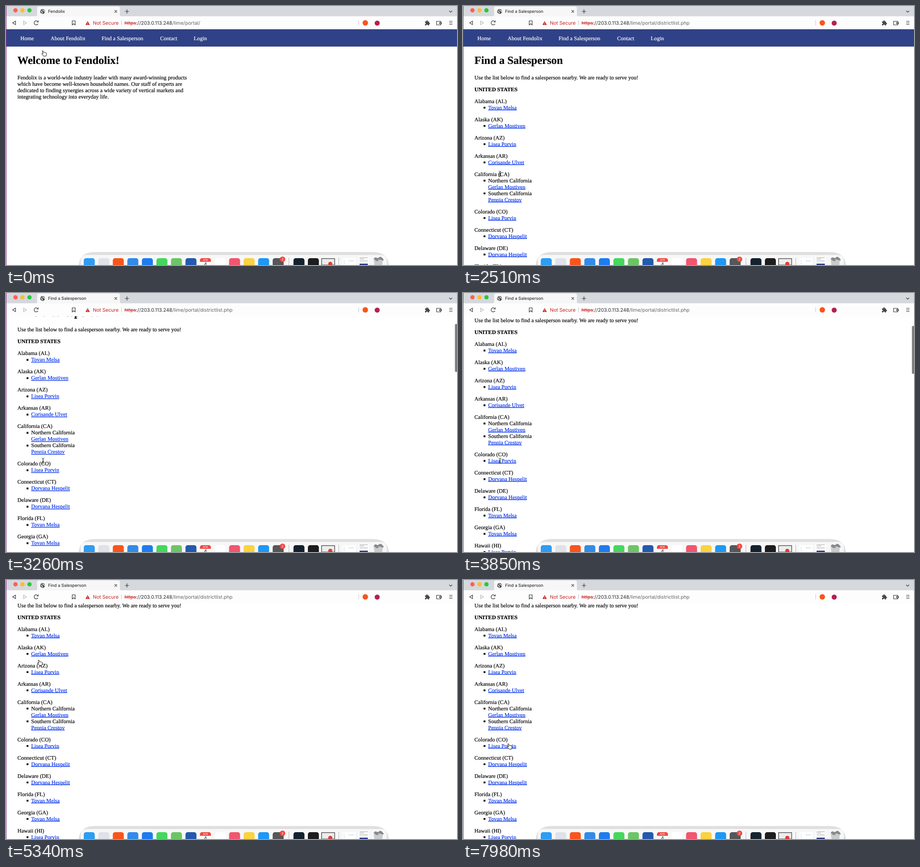
An HTML page that plays this animation: 986 px wide and 568 px high, repeating every 8 s.

```html
<!DOCTYPE html>
<html lang="en">
<head>
<meta charset="utf-8">
<title>Browser walkthrough</title>
<style>
  html, body { margin: 0; width: 100%; height: 100%; overflow: hidden; background: #fff; }
  svg { display: block; width: 986px; height: 568px; }
  text { white-space: pre; text-rendering: geometricPrecision; }
  .page { font: 12.05px "Liberation Serif", "Times New Roman", serif; }
  .page text { stroke: #000; stroke-width: .2; }
  .page #nav text { stroke: #fff; }
  .page .title { font-size: 24px; font-weight: bold; }
  .page .bold { font-weight: bold; }
  .page .link { fill: #0230ea; stroke: #0230ea; text-decoration: underline; }
  .ui { font-family: Inter, Roboto, sans-serif; }
  .line { fill: none; stroke: #333; stroke-width: 1.2; }
</style>
</head>
<body>
<svg viewBox="0 0 986 568">
  <defs>
    <clipPath id="view"><rect y="51" width="986" height="517"/></clipPath>
    <linearGradient id="fade" gradientUnits="userSpaceOnUse" x1="212" x2="230">
      <stop stop-color="#303236"/><stop offset="1" stop-color="#303236" stop-opacity="0"/>
    </linearGradient>
  </defs>
  <rect width="986" height="568" fill="#fff"/>

  <g class="page" clip-path="url(#view)">
    <g id="scroller">
      <rect y="51" width="986" height="38" fill="#304287"/>
      <g id="nav" fill="#fff"></g>
      <g id="home"></g>
      <g id="list"></g>
    </g>
    <rect id="thumb" x="981.5" y="52" width="6" height="105" rx="2" fill="#7c7c7c"/>
  </g>

  <g class="ui">
    <rect width="986" height="23" fill="#d5d8dc"/>
    <rect y="22.5" width="986" height="28.5" fill="#fdfdfd"/>
    <path d="M64 23q4 0 4-4V5q0-4 4-4h173q4 0 4 4v14q0 4 4 4z" fill="#f7f7f7"/>
    <circle cx="20.7" cy="9.5" r="4.7" fill="#fe5f57"/>
    <circle cx="36" cy="9.5" r="4.7" fill="#febc2e"/>
    <circle cx="51.3" cy="9.5" r="4.7" fill="#28c840"/>
    <g id="globe">
      <circle cx="80" cy="12" r="5.2" fill="#4b4d50"/>
      <path d="M76 11q2 0 3 2t-1 3M80 8q0 2 2 2t2 3" fill="none" stroke="#f7f7f7" stroke-width="1.4"/>
    </g>
    <path id="spinner" d="M77 8.5q2-1.8 4 0" fill="none" stroke="#e9c3b4"/>
    <text id="tabTitle" x="92" y="15.3" font-size="9.2" font-weight="500"></text>
    <path class="line" d="M237.5 9.5l5 5m0-5l-5 5M260 12h9m-4.5-4.5v9M969 10.5l3.2 3.2 3.2-3.2"/>

    <path class="line" d="M20.8 33v8l-6.3-4z"/>
    <path class="line" d="M38.5 33v8l6.3-4z" style="stroke:#b5b5b5"/>
    <path id="reload" class="line" d="M70 39a4.5 4.5 0 1 1-.8-5.2M70.5 31.8v3.4h-3.4"/>
    <path id="stop" class="line" d="M61.5 32.5l9 9m0-9l-9 9"/>
    <path class="line" d="M144.8 32.5h6.4v9l-3.2-2.5-3.2 2.5z"/>
    <path d="M178.5 33l4.7 8.500h-9.4z" fill="#c5221f"/>
    <path d="M178.5 35.8v2.7m0 .8v1.2" stroke="#fff"/>
    <path d="M252.5 31.5v11M771 31.5v11" stroke="#c4c4c8"/>
    <g font-size="10.6">
      <text x="190" y="41" fill="#c5221f">Not Secure</text>
      <text x="259" y="41" fill="#27292c"><tspan fill="#c5221f" text-decoration="line-through">https</tspan>://203.0.113.248<tspan id="path" fill="#606368"></tspan></text>
    </g>
    <circle cx="785.5" cy="37" r="6" fill="#f9541c"/>
    <circle cx="811.5" cy="37.5" r="5.5" fill="#b3204f"/>
    <path d="M916 34h3q-.5-2.500 1.500-2.500T922 34h3v3q2-.3 2 1.500t-2 1.500v2.500h-3q0-2-1.500-2T919 42.500h-3v-3q2 0 2-1.500t-2-1.300z" fill="#45474a"/>
    <path class="line" d="M941.5 33.5h9v8h-9zM952 36h-4.5v3h4.5zM969 33.5h7M969 37h7M969 40.5h7"/>

    <g id="dock">
      <path d="M159 568q2-28.5 36-28.5h606q34 0 36 28.5z" fill="#dfdfdf"/>
      <path d="M163.5 568v-10q0-12 13-12h643q13 0 13 12v10z" fill="#f7f7f7"/>
    </g>
  </g>
  <path d="M.5 0v568" stroke="#85348f"/>

  <g id="cursor" stroke="#111" stroke-linejoin="round">
    <path id="hand" fill="#fff" d="M-4.2-5.3q.9-1.5 2.1 0l1.4 3.2q1.2-.8 1.8.3 1.3-.6 1.9.4 1.6-.3 1.9 1v3L4 6h-5.5L-5 1.6q-.8-1.6.6-1.7l2 1z"/>
    <path id="beam" fill="none" stroke-width=".8" d="M-2.5-6Q0-6 0-4.5V4.5Q0 6-2.5 6M2.5-6Q0-6 0-4.5V4.5Q0 6 2.5 6M-1.5 2h3"/>
  </g>
</svg>

<script>
const LOOP = 8000, TICK = 148;
const $ = id => document.getElementById(id);

function add(parent, tag, attrs, content = "") {
  const node = document.createElementNS("http://www.w3.org/2000/svg", tag);
  for (const name in attrs) node.setAttribute(name, attrs[name]);
  node.textContent = content;
  $(parent).append(node);
}
const write = (parent, x, y, content, style = "") =>
  add(parent, "text", { x, y, class: style }, content);

// Page contents
[["Home", 31.5], ["About Fendolix", 97.5], ["Find a Salesperson", 209], ["Contact", 337], ["Login", 410.5]]
  .forEach(([label, x]) => write("nav", x, 75.3, label));

write("home", 25, 127, "Welcome to Fendolix!", "title");
["Fendolix is a world-wide industry leader with many award-winning products",
 "which have become well-known household names. Our staff of experts are",
 "dedicated to finding synergies across a wide variety of vertical markets and",
 "integrating technology into everyday life."
].forEach((line, i) => write("home", 25, 160.5 + 14 * i, line));

write("list", 25, 127, "Find a Salesperson", "title");
write("list", 25, 160.5, "Use the list below to find a salesperson nearby. We are ready to serve you!");
write("list", 25, 186.5, "UNITED STATES", "bold");

const [tovan, gerlan, lisea, corisande, pennia, dorvana] = ["Tovan Melsa", "Gerlan Mostiven",
  "Lisea Porvin", "Corisande Ulvet", "Pennia Crestov", "Dorvana Hespelit"];
const states = [
  ["Alabama (AL)", tovan], ["Alaska (AK)", gerlan], ["Arizona (AZ)", lisea], ["Arkansas (AR)", corisande],
  ["California (CA)", ["Northern California", gerlan], ["Southern California", pennia]],
  ["Colorado (CO)", lisea], ["Connecticut (CT)", dorvana], ["Delaware (DE)", dorvana],
  ["Florida (FL)", tovan], ["Georgia (GA)", tovan], ["Hawaii (HI)", lisea]
];
let y = 212.5;
for (const [state, ...entries] of states) {
  write("list", 25, y, state);
  for (const entry of entries) {
    const [person, region] = [entry].flat().reverse();
    add("list", "rect", { x: 45, y: y + 8.5, width: 4, height: 4 });
    if (region) write("list", 55, y += 14, region);
    write("list", 55, y += 14, person, "link");
  }
  y += 26;
}

// Dock
const tile = (center, fill) =>
  add("dock", "rect", { x: center - 12, y: 553, width: 24, height: 24, rx: 5, fill });
const label = (x, y, size, fill, content) =>
  add("dock", "text", { x, y, "font-size": size, fill, "text-anchor": "middle" }, content);
["#2c9df4", "#dfe2e8", "#f9541c", "#318be8", "#1e7cf0", "#44d85c", "#6cc565", "#2359ae", "#fdfdfd",
 "#fff", "#f2556f", "#fbd23f", "#1c98f5", "#55575a"].forEach((fill, i) => tile(182 + 31.77 * i, fill));
add("dock", "path", { d: "M424 561v-3q0-5 5-5h14q5 0 5 5v3z", fill: "#ee4a43" });
label(436, 559.3, 5.5, "#fff", "APR");
label(436, 571, 12, "#333", "4");
add("dock", "circle", { cx: 604.5, cy: 555.5, r: 6, fill: "#f2453d" });
label(604.5, 558.3, 7.5, "#fff", "2");
add("dock", "path", { d: "M618.5 552v16M727.5 552v16", stroke: "#b9b9b9" });
tile(640.5, "#14212f");
tile(672, "#1d1d1f");
add("dock", "path", { d: "M690 554h28.5v14H690z", fill: "#ededed", stroke: "#555", "stroke-width": 1.5 });
add("dock", "circle", { cx: 709, cy: 565.5, r: 4.5, fill: "#e33b32" });
add("dock", "path", { d: "M736 553h28v15h-28zM771 550h22v18h-22z", fill: "#fff" });
add("dock", "path", { d: "M738 559h3m-3 5h3m8-5h12", stroke: "#9ecdf0" });
add("dock", "path", { d: "M773 552h18m-18 3h10m-10 4h18", stroke: "#999" });
add("dock", "path", { d: "M773 566.5h18", stroke: "#304287", "stroke-width": 3 });
add("dock", "path", { d: "M803.5 554h21l-2 14h-17z", fill: "#c9cbcc" });
add("dock", "path", { d: "M804 554q3-4 6-2t6-1 8 3-4 3-6 0-5 2z", fill: "#85898b" });

// Cursor stops: tick, x, y, shape shown from there on
const stops = [
  [2, 83.5, 104, "hand"], [4, 38, 138, "beam"], [6, 112, 117, "beam"], [9, 267, 80, "hand"],
  [15, 267, 80, "hand"], [17, 81, 368, "beam"], [27, 81, 368, "beam"], [28, 108, 427, "hand"],
  [34, 64, 125, "hand"], [35, 64, 125, "hand"], [40, 116, 407, "hand"], [41, 116, 407, "hand"],
  [43, 108, 382, "beam"], [44, 108, 382, "beam"], [45, 108, 394, "beam"], [49, 112, 407, "hand"],
  [50, 112, 407, "hand"], [54, 102, 365, "hand"]
];

function cursorAt(tick) {
  const next = stops.findIndex(stop => stop[0] > tick);
  if (next < 0) return stops.at(-1).slice(1);
  if (next === 0) return stops[0].slice(1);
  const [from, to] = [stops[next - 1], stops[next]];
  const part = (tick - from[0]) / (to[0] - from[0]);
  return [from[1] + (to[1] - from[1]) * part, from[2] + (to[2] - from[2]) * part, from[3]];
}

function scrollAt(tick) {
  if (tick < 20) return 0;
  return tick < 28 ? 101 - 59.5 * 0.644 ** (tick - 20) : 101;
}

const show = (id, visible) => $(id).style.display = visible ? "" : "none";

function draw(time) {
  // The screen refreshes in coarse, even ticks.
  const tick = Math.floor((time + 12) / TICK);
  const clicked = tick >= 11, loaded = tick >= 13, loading = clicked && !loaded;
  const scroll = scrollAt(tick);

  $("scroller").setAttribute("transform", `translate(0 ${-scroll})`);
  $("thumb").setAttribute("y", 52 + scroll * 0.208);
  show("thumb", scroll > 0 && tick < 32);
  show("home", !loaded);
  show("list", loaded);
  show("globe", !loading);
  show("spinner", loading);
  show("reload", !loading);
  show("stop", loading);

  $("path").textContent = "/lime/portal/" + (clicked ? "districtlist.php" : "");
  $("tabTitle").textContent = loading ? "https://203.0.113.248/lime/port"
    : loaded ? "Find a Salesperson" : "Fendolix";
  $("tabTitle").setAttribute("fill", loading ? "url(#fade)" : "#303236");

  const [x, y, shape] = cursorAt(tick);
  $("cursor").setAttribute("transform", `translate(${x} ${y})`);
  show("hand", shape === "hand");
  show("beam", shape === "beam");
}

function frame() {
  draw(performance.now() % LOOP);
  requestAnimationFrame(frame);
}
frame();
</script>
</body>
</html>
```
